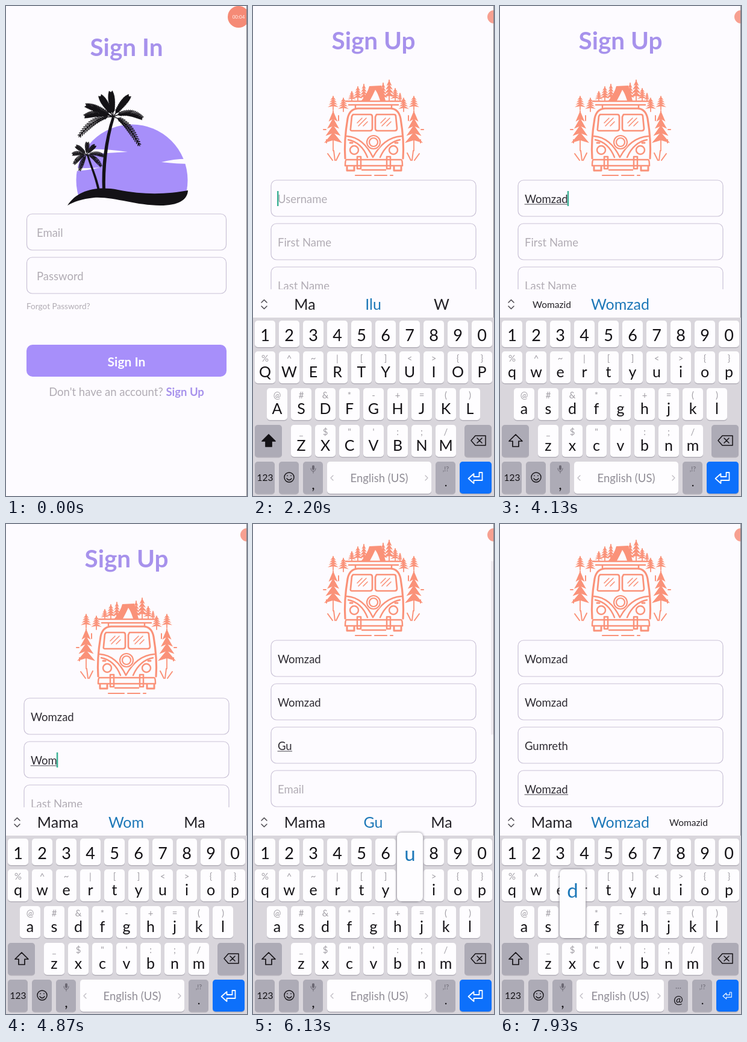
An HTML page with a canvas that plays this animation: 400 px wide and 813 px high, repeating every 8 s.

```html
<!DOCTYPE html>
<html lang="en">
<head>
<meta charset="utf-8">
<title>Sign up flow</title>
<style>
html, body { margin: 0; width: 400px; height: 813px; overflow: hidden; background: #fdfbff; }
canvas { display: block; }
</style>
</head>
<body>
<canvas id="stage" width="400" height="813"></canvas>
<script>
const W = 400, H = 813, LOOP = 8000;
const stage = document.getElementById('stage');
const view = stage.getContext('2d');
const buffer = document.createElement('canvas');
buffer.width = W;
buffer.height = H;
const sheet = buffer.getContext('2d');
let c = view;

const BG = '#fdfbff', PURPLE = '#a78ffa', TITLE = '#a792ec', HINT = '#b1acb4';
const EDGE = '#c9c1d6', INK = '#141216', ORANGE = '#fa9279', BLUE = '#1d78b8';
const KEYS = '#d9d6dc', GREY = '#adabb6', MARK = '#a09da4', TEAL = '#3db296';
const NAME = 'Womzad', LONGER = 'Womazid';

const fields = [
  { hint: 'Username', word: NAME, focus: 1950, start: 2700, gap: 215 },
  { hint: 'First Name', word: NAME, focus: 4230, start: 4560, gap: 105 },
  { hint: 'Last Name', word: 'Gumreth', focus: 5800, start: 5950, gap: 140 },
  { hint: 'Email', word: NAME, focus: 6950, start: 7250, gap: 130 },
  { hint: 'Password', word: '', focus: Infinity, start: Infinity, gap: 1 }
];
const scrollStops = [[5080, 0], [5400, 37], [5700, 96], [6850, 96], [7000, 92], [7130, 92], [7300, 96]];

const clamp = v => Math.max(0, Math.min(1, v));
const span = (t, a, b) => clamp((t - a) / (b - a));
const easeOut = (p, n = 3) => 1 - (1 - p) ** n;

function scrollAt(t) {
  let y = 0;
  scrollStops.forEach(([at, value], i) => {
    const [from, start] = scrollStops[i - 1] || [0, 0];
    if (t >= from) y = start + (value - start) * span(t, from, at);
  });
  return y;
}

function text(str, x, y, size, color, align = 'center', weight = 400) {
  c.font = `${weight} ${size}px Lato, "Open Sans", sans-serif`;
  c.textAlign = align;
  c.fillStyle = color;
  c.fillText(str, x, y + size * 0.36);
  return c.measureText(str).width;
}

function box(x, y, w, h, r, fill, stroke) {
  c.beginPath();
  c.roundRect(x, y, w, h, r);
  if (fill) { c.fillStyle = fill; c.fill(); }
  if (stroke) { c.strokeStyle = stroke; c.lineWidth = 1.2; c.stroke(); }
}

function disc(x, y, r, fill) {
  c.beginPath();
  c.arc(x, y, r, 0, 7);
  c.fillStyle = fill;
  c.fill();
}

function line(path, color, width = 1.6) {
  c.strokeStyle = color;
  c.lineWidth = width;
  c.lineCap = c.lineJoin = 'round';
  c.stroke(new Path2D(path));
}

function shape(path, color) {
  c.fillStyle = color;
  c.fill(new Path2D(path));
}

// Draws a group with its own opacity and a zoom about the stage centre.
function layer(alpha, scale, draw) {
  if (alpha <= 0) return;
  c = sheet;
  c.setTransform(1, 0, 0, 1, 0, 0);
  c.clearRect(0, 0, W, H);
  c.translate(W / 2, H / 2);
  c.scale(scale, scale);
  c.translate(-W / 2, -H / 2);
  draw();
  c = view;
  c.globalAlpha = alpha;
  c.drawImage(buffer, 0, 0);
  c.globalAlpha = 1;
}

// A drooping palm leaf: slim leaflets swept towards the tip on both sides.
function frond(x, y, tx, ty, lift, leaf) {
  const mx = (x + tx) / 2, my = (y + ty) / 2 - lift;
  let path = `M${x} ${y}Q${mx} ${my} ${tx} ${ty}`;
  for (let i = 3; i < 18; i++) {
    const p = i / 18, q = 1 - p;
    const px = q * q * x + 2 * q * p * mx + p * p * tx;
    const py = q * q * y + 2 * q * p * my + p * p * ty;
    const a = Math.atan2(q * (my - y) + p * (ty - my), q * (mx - x) + p * (tx - mx));
    const len = leaf * (0.3 + Math.sin(p * 3) * 0.7);
    for (const s of [-0.6, 0.6])
      path += `M${px} ${py}l${len * Math.cos(a + s)} ${len * Math.sin(a + s)}`;
  }
  line(path, INK, leaf / 6);
}

function beach() {
  c.save();
  c.beginPath();
  c.rect(100, 190, 210, 124);
  c.clip();
  disc(209, 289, 92.5, PURPLE);
  shape('M112 239Q150 235 202 242Q160 244 112 248ZM112 268Q130 270 156 268Q136 273 112 274ZM258 259Q282 253 306 254V262Q284 262 258 259Z', BG);
  c.restore();
  shape('M102 331C118 306 150 298 186 305C230 314 270 312 302 306C301 322 286 331 256 331C215 331 178 316 146 318C126 320 112 325 102 331Z', INK);
  shape('M160 306C158 268 163 222 176 184L180 186C168 225 164 270 165 306Z', INK);
  shape('M152 306C147 282 140 268 134 248L137 247C143 267 151 282 156 306Z', INK);
  [[121, 217, 20], [131, 183, 9], [133, 165, 4], [157, 150, 1], [174, 143, 0], [204, 150, 3],
   [226, 186, 14], [222, 232, 20]].forEach(([x, y, lift]) => frond(178, 184, x, y, lift, 9));
  [[113, 262, 7], [111, 246, 4], [117, 233, 2], [135, 227, 0], [147, 232, 2], [162, 249, 6],
   [158, 266, 8], [122, 273, 7]].forEach(([x, y, lift]) => frond(134, 247, x, y, lift, 6));
}

function pine(x, top, bottom, half) {
  const h = (bottom - top) * 0.82;
  for (let i = 0; i < 4; i++) {
    const y = top + h * i / 4.6, w = half * (0.5 + i / 6);
    shape(`M${x} ${y}l${w} ${h * 0.33}l${-w} ${-h * 0.08}l${-w} ${h * 0.08}Z`, ORANGE);
  }
  line(`M${x} ${top}V${bottom}`, ORANGE, 1.8);
}

function van() {
  for (const s of [-1, 1]) {
    pine(200 + s * 67, 174, 240, 15);
    pine(200 + s * 67, 150, 172, 9);
    pine(200 + s * 50, 153, 175, 9);
    line(`M${200 + s * 62} 256l${-s * 6} -12m${s * 8} 12l${s * 2} -16m${s * 2} 16l${s * 8} -11`, ORANGE, 2);
    line(`M${200 + s * 79} 205h${s * 4}M${200 + s * 78} 222v5M${200 + s * 58} 182v8`, ORANGE, 2);
  }
  [[164, 142, 7], [174, 134, 8], [184, 130, 7], [216, 128, 7], [226, 123, 9], [236, 137, 8], [244, 145, 5]]
    .forEach(([x, y, w]) => pine(x, y, 158, w));
  shape('M180 157Q190 145 193 133L213 132L220 157H211Q207 144 203 139Q199 148 194 157Z', ORANGE);
  line('M154 158H248M159 164H241M170 164v5M230 164v5', ORANGE, 2.5);
  line('M153 253C151 226 154 205 157 187Q160 171 174 170H229Q242 171 245 187C248 205 251 226 249 253', ORANGE, 3.2);
  line('M166 180H195Q198 180 198 184V203Q198 207 194 207H164Q161 207 162 203L164 183ZM205 180H234Q237 180 237 183L239 203Q239 207 235 207H207Q203 207 203 203V184Z', ORANGE, 2.7);
  line('M173 194l8 -8M175 199l13 -13M183 199l7 -7M212 194l8 -8M214 199l13 -13M222 199l7 -7', ORANGE, 1.6);
  line('M156 216Q183 218 199 251Q217 218 246 216M158 222Q180 226 190 251M244 222Q222 226 211 251', ORANGE, 2.5);
  disc(200, 226, 13, BG);
  line('M189 226a11 11 0 1 0 22 0a11 11 0 1 0 -22 0M193 226a7 7 0 1 0 14 0a7 7 0 1 0 -14 0', ORANGE, 2.2);
  line('M161 239a7 7 0 1 0 14 0a7 7 0 1 0 -14 0M226 239a7 7 0 1 0 14 0a7 7 0 1 0 -14 0', ORANGE, 2.5);
  line('M161 227h4M236 227h4M156 267v6h12v-6M234 267v6h12v-6', ORANGE, 3);
  box(153, 255, 95, 10, 4, BG);
  line('M155 255H246Q248 255 248 265H153Q153 255 155 255ZM173 250h6v20h-6ZM222 250h6v20h-6ZM181 272H220', ORANGE, 2.5);
  line('M170 281H196M202 281H222M228 281H232', ORANGE, 2.2);
}

function footer(ask, link, y) {
  c.font = '400 18.5px Lato, sans-serif';
  const a = c.measureText(ask).width;
  c.font = '700 18.5px Lato, sans-serif';
  const x = 200 - (a + c.measureText(link).width) / 2;
  text(ask, x, y, 18.5, HINT, 'left');
  text(link, x + a, y, 18.5, TITLE, 'left', 700);
}

function signIn() {
  text('Sign In', 200, 68, 40.5, TITLE, 'center', 700);
  beach();
  ['Email', 'Password'].forEach((hint, i) => {
    box(34.5, 345 + 72 * i, 331, 60, 9, null, EDGE);
    text(hint, 51, 376 + 72 * i, 18.5, HINT, 'left');
  });
  text('Forgot Password?', 34, 498, 13.6, HINT, 'left');
  box(34, 562, 332, 53, 10, PURPLE);
  text('Sign In', 200, 590, 21, '#fffdff', 'center', 700);
  footer('Don\'t have an account? ', 'Sign Up', 640);
}

function typed(field, t) {
  const n = t < field.start ? 0 : Math.floor((t - field.start) / field.gap) + 1;
  return field.word.slice(0, n);
}

function lastKey(field, t) {
  const n = typed(field, t).length;
  return n ? field.start + (n - 1) * field.gap : field.focus;
}

function signUp(t, active) {
  text('Sign Up', 200, 57, 40.5, TITLE, 'center', 700);
  van();
  fields.forEach((f, i) => {
    const y = 289 + 72 * i, str = typed(f, t);
    box(30, y, 340, 60, 9, null, EDGE);
    const w = text(str || f.hint, 41, y + 31, 18.5, str ? '#2e2b32' : HINT, 'left');
    if (f !== active) return;
    if (str) line(`M41 ${y + 40}h${w}`, '#45424a', 1);
    const beat = (t - lastKey(f, t)) % 1000;
    if (beat >= 60 && beat < 560) {
      c.fillStyle = TEAL;
      c.fillRect(40 + (str ? w : 0), y + 18, 2.5, 25);
    }
  });
  box(30, 671, 340, 53, 10, PURPLE);
  text('Sign Up', 200, 699, 21, '#fffdff', 'center', 700);
  footer('Already have an account? ', 'Sign In', 749);
}

function key(x, y, w, h, fill = '#fefdff') {
  box(x, y + 1.5, w, h, 5, '#b4b1ba');
  box(x, y, w, h, 5, fill);
}

const rows = [
  ['qwertyuiop', '%^~|[]<>{}', 3, 573],
  ['asdfghjkl', '@#&*-+=()', 23, 634],
  ['zxcvbnm', '_$"\':;/', 63, 695]
];

function popup(letter) {
  rows.forEach(([letters, , x0, y]) => {
    const i = letters.indexOf(letter.toLowerCase());
    if (i < 0) return;
    const x = x0 + 40 * i - 4;
    c.shadowColor = '#85828c';
    c.shadowBlur = 4;
    box(x, y - 61, 43, 114, 7, '#fefdff');
    c.shadowBlur = 0;
    text(letter, x + 21.5, y - 26, 33, BLUE);
  });
}

function suggestions(active, str) {
  line('M14 492l4.500 -4.500l4.500 4.500M14 498l4.500 4.500l4.500 -4.500', '#4b484f', 1.5);
  const mail = active === fields[3];
  if (mail && !str) return text('Wom...@fel...com', 200, 495, 11.5, '#3c8a88');
  let words = ['Ma', 'Ilu', 'W'];
  if (str) words = ['Mama', str, 'Ma'];
  if (str === NAME) words = mail ? ['Mama', NAME, LONGER] : [LONGER, NAME, ''];
  words.forEach((word, i) => {
    const mid = i === 1;
    text(word, 86 + 113.5 * i, 495, !mid && word.length > 5 ? 15.5 : 25, mid ? BLUE : '#232126');
  });
}

function bottomRow(mail) {
  const y = 756, h = 53;
  const x = mail ? [3, 47, 87, 127, 319, 359] : [3, 43, 83, 123, 303, 343];
  key(x[0], y, mail ? 37 : 33, h, GREY);
  text('123', x[0] + (mail ? 18.5 : 17), 782, 15.5, INK);
  key(x[1], y, 33, h, GREY);
  const fx = x[1] + 17;
  line(`M${fx - 8} 782a8 8 0 1 0 16 0a8 8 0 1 0 -16 0M${fx - 4} 784q4 5 8 0M${fx - 3} 779v.5M${fx + 3} 779v.5`, INK, 1.4);
  key(x[2], y, 33, h, GREY);
  const mx = x[2] + 17;
  box(mx - 2, 762, 4, 8, 2, '#6b6873');
  line(`M${mx - 4} 767q0 5 4 5q4 0 4 -5M${mx} 772v3`, '#6b6873', 1);
  text(',', mx, 793, 24, INK);
  const sw = mail ? 145 : 173, sx = x[3];
  key(sx, y, sw, h);
  text('English (US)', sx + sw / 2, 783, 18.5, '#918e97');
  line(`M${sx + 10} 779l-4 4l4 4M${sx + sw - 10} 779l4 4l-4 4`, '#bcb9c1', 1.2);
  if (mail) {
    key(279, y, 33, h, GREY);
    text('...', 296, 766, 14, '#6b6873');
    text('@', 296, 789, 19, INK);
  }
  key(x[4], y, 33, h, GREY);
  text(',!?', x[4] + 17, 768, 11, '#6b6873');
  text('.', x[4] + 17, 790, 20, INK);
  const ew = mail ? 37 : 53, ex = x[5] + ew / 2, k = mail ? 0.62 : 1;
  key(x[5], y, ew, h, '#0d70fb');
  c.save();
  c.translate(ex, 782);
  c.scale(k, k);
  line('M-12 2l9 -8v5h9v-7h5v13h-14v5Z', '#f5faff', 1.8);
  c.restore();
}

function keyboard(t, active, str) {
  c.fillStyle = BG;
  c.fillRect(0, 470, W, 47);
  c.fillStyle = KEYS;
  c.fillRect(0, 517, W, 296);
  suggestions(active, str);
  const mail = active === fields[3];
  const upper = !str && !mail;
  [...'1234567890'].forEach((d, i) => {
    key(3 + 40 * i, 522, 34, 44);
    text(d, 20 + 40 * i, 546, 27, INK);
  });
  rows.forEach(([letters, marks, x0, y]) => [...letters].forEach((ch, i) => {
    const x = x0 + 40 * i;
    key(x, y, 34, 53);
    text(marks[i], x + 17, y + 12, 15, MARK);
    text(upper ? ch.toUpperCase() : ch, x + 17, y + 34, 25, INK);
  }));
  key(3, 695, 45, 53, GREY);
  const arrow = 'M26 711l11 11h-6v9h-10v-9h-6Z';
  if (upper) shape(arrow, INK);
  line(arrow, INK, 1.7);
  key(351, 695, 45, 53, GREY);
  line('M362 721l7 -8h17v16h-17ZM372 717l8 8M380 717l-8 8', INK, 1.5);
  bottomRow(mail && t >= 7130);
  if (str && t - lastKey(active, t) < 90) popup(str[str.length - 1]);
}

// The timer badge shrinks as it docks at the right edge.
function bubble(t) {
  const p = easeOut(span(t, 250, 650));
  const x = 386 + 14 * p;
  c.globalAlpha = 1 - 0.2 * p;
  disc(x, 18, 18 - 7 * p, '#f58a76');
  if (p < 1) text('00:04', x, 18, 8 * (1 - p), '#fff3f0');
  c.globalAlpha = 1;
}

function draw(t) {
  c = view;
  c.fillStyle = BG;
  c.fillRect(0, 0, W, H);
  const p = span(t, 950, 1500), zoom = easeOut(p, 5);
  const active = fields.filter(f => t >= f.focus).pop();
  const rise = easeOut(span(t, 1830, 2130));
  const drop = 343 * (1 - rise), scroll = scrollAt(t);

  layer(Math.min(1, 1.45 * (1 - p)), 1 + 0.148 * zoom, signIn);
  layer(p ** 1.7, 0.85 + 0.15 * zoom, () => {
    c.translate(0, -scroll);
    signUp(t, active);
  });

  const bar = Math.min(span(t, 5060, 5160), 1 - span(t, 5900, 6200));
  if (bar > 0) {
    c.globalAlpha = bar;
    c.fillStyle = '#b9b3bb';
    c.fillRect(395, 2 + scroll * 0.62, 5, 288);
    c.globalAlpha = 1;
  }
  if (rise > 0) {
    c.save();
    c.translate(0, drop);
    keyboard(t, active, active ? typed(active, t) : '');
    c.restore();
  }
  bubble(t);
  c.fillStyle = '#85838a';
  c.fillRect(399, 0, 1, rise > 0 ? 517 + drop : H);
}

function tick(now) {
  draw(now % LOOP);
  requestAnimationFrame(tick);
}
requestAnimationFrame(tick);
</script>
</body>
</html>
```
